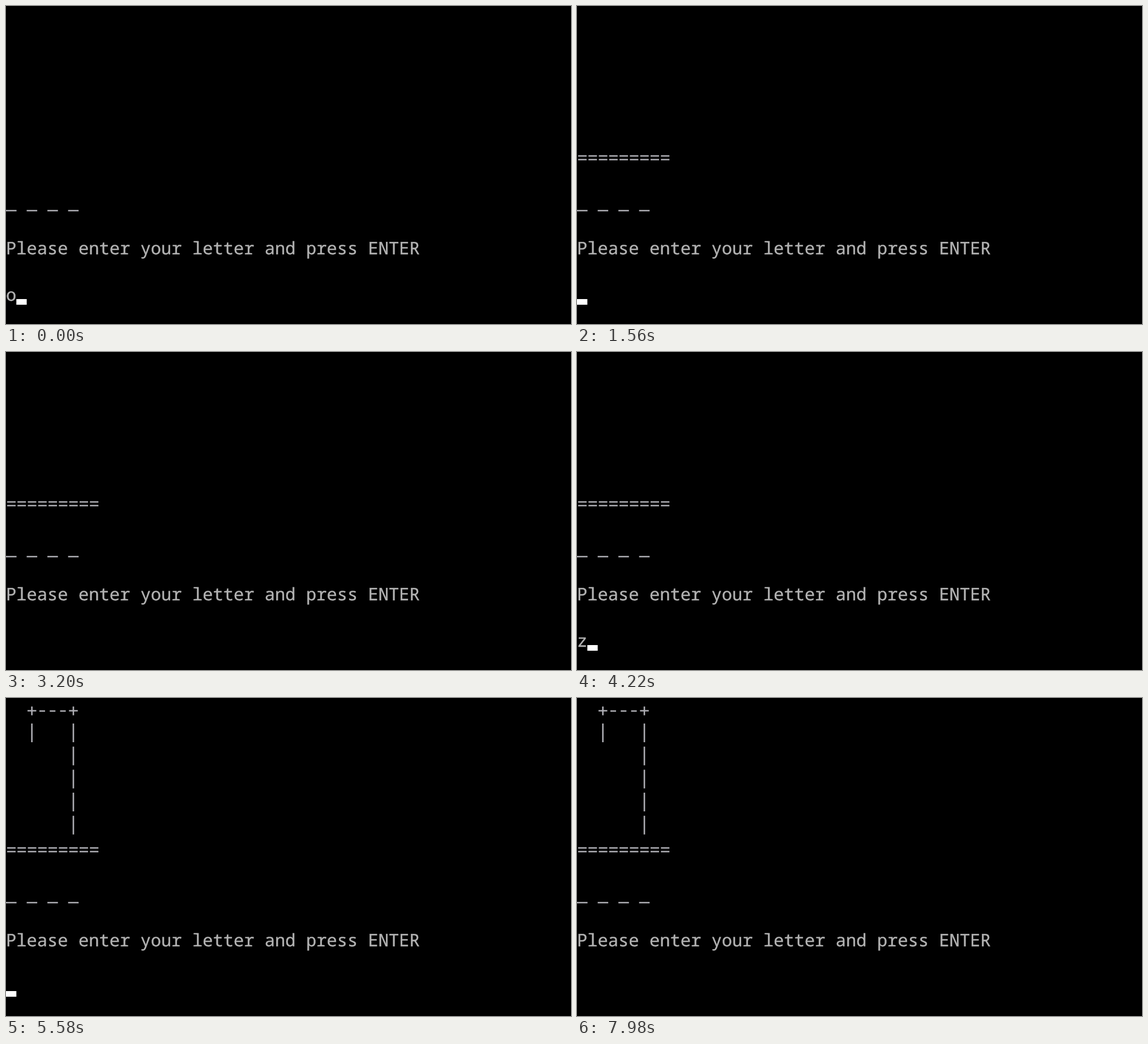
Write an HTML page that moves like this. It is 998 px wide and 561 px high and loops after 8000 ms.

```html
<!DOCTYPE html>
<html lang="en">
<head>
<meta charset="utf-8">
<title>Hangman console</title>
<style>
  html, body { margin: 0; width: 100%; height: 100%; overflow: hidden; background: #000; }
  svg { display: block; }
  text {
    font: 30.46px "Noto Sans Mono", monospace;
    fill: #b2b2b2;
    stroke: #b2b2b2;
    stroke-width: .4;
    text-rendering: geometricPrecision;
  }
  path { fill: none; stroke: #aeaeb4; stroke-width: 2.6; }
</style>
</head>
<body>
<svg width="998" height="561" viewBox="0 0 998 561">
  <g id="gallows">
    <path d="M38 22.5H53.5M45.7 15V30.5M111.3 22.5H126.8M119 15V30.5" stroke-width="3"/>
    <path d="M59 23H106" stroke-dasharray="10 8.28"/>
    <path d="M45.7 45V78" stroke-width="3.4"/>
    <path d="M119 45V242" stroke-width="3.4" stroke-dasharray="33 7.7"/>
  </g>
  <path id="base" d="M2 264.5H164M2 271H164" stroke-width="2.4" stroke-dasharray="15 3.28"/>
  <path d="M0 361H129" stroke-dasharray="18.6 17.96"/>
  <text x="0" y="438">Please enter your letter and press ENTER</text>
  <text id="typed" x="0" y="519.5"></text>
  <rect id="cursor" y="517" width="18.3" height="10" fill="#fff"/>
</svg>
<script>
  const LOOP = 8000;
  const CELL = 18.28;
  const [gallows, base, typed, cursor] =
    ["gallows", "base", "typed", "cursor"].map(id => document.getElementById(id));

  // Each state holds from its start time until the next one.
  const states = [
    { at: 0,    letter: "o", cursor: true,  base: false, gallows: false },
    { at: 100,  letter: "",  cursor: true,  base: true,  gallows: false },
    { at: 3100, letter: "",  cursor: false, base: true,  gallows: false },
    { at: 3900, letter: "z", cursor: true,  base: true,  gallows: false },
    { at: 4660, letter: "",  cursor: true,  base: true,  gallows: true },
    { at: 7660, letter: "",  cursor: false, base: true,  gallows: true }
  ];

  const show = (node, on) => node.setAttribute("visibility", on ? "visible" : "hidden");

  function render(time) {
    const state = states.findLast(s => s.at <= time);
    typed.textContent = state.letter;
    cursor.setAttribute("x", state.letter.length * CELL);
    show(cursor, state.cursor);
    show(base, state.base);
    show(gallows, state.gallows);
  }

  const start = performance.now();
  function tick() {
    render((performance.now() - start) % LOOP);
    requestAnimationFrame(tick);
  }
  tick();
</script>
</body>
</html>
```
